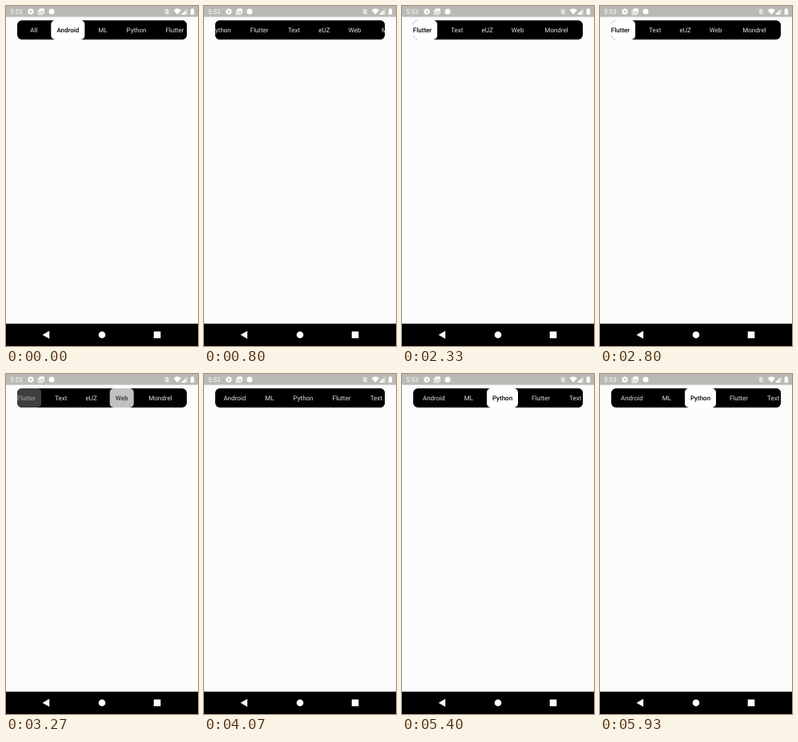
Recreate the animation shown at these times as an HTML page. Size 240 by 426 pixels, loop 5.99 s.

```html
<!DOCTYPE html>
<html lang="en">
<head>
<meta charset="utf-8">
<title>Scrolling tabs</title>
<style>
  html, body { margin: 0; width: 100%; height: 100%; overflow: hidden; background: #fcfcfc; }
  svg { display: block; width: 100%; height: 100%; }
  text { font-family: Roboto, Arial, sans-serif; font-size: 8px; text-rendering: geometricPrecision; }
</style>
</head>
<body>
<svg viewBox="0 0 240 426">
  <defs>
    <clipPath id="trackClip"><rect x="14" y="18" width="212" height="24" rx="6"/></clipPath>
  </defs>
  <rect width="240" height="426" fill="#fcfcfc"/>

  <g id="statusBar" fill="#fff">
    <rect width="240" height="13.6" fill="#b9b9b6"/>
    <text x="5" y="10">5:53</text>
    <g fill="none" stroke="#fff">
      <circle cx="31" cy="7" r="2.2" stroke-width="1.9"/>
      <circle cx="31" cy="7" r="3.5" stroke-width="1.1" stroke-dasharray="1.8 1.865"/>
      <path d="M40.2 5v5.8h6" stroke-width=".9"/>
    </g>
    <rect x="41.5" y="3.2" width="6.5" height="6.2" rx=".7"/>
    <path d="M42.5 8.3l1.5-2 1 1.2 1-1.5 1.3 2.3z" fill="#b9b9b6"/>
    <circle cx="57" cy="7" r="3.5"/>
    <path d="M198.3 9.5l1-1V6.4q0-2 1.7-2.4.2-1 .8 0 1.7.4 1.7 2.4v2.1l1 1zM200.5 10h1.8q-.9 1.3-1.8 0z" fill-opacity=".85"/>
    <path d="M198 3.4l6.8 7.2" stroke="#b9b9b6" stroke-width="1.5"/>
    <path d="M198 3.4l6.8 7.2" stroke="#fff" stroke-width=".7"/>
    <path d="M209.5 5.2q4.7-3.7 9.4 0L214.2 10.8z"/>
    <path d="M219 10.8l7.5-7.5v7.5z" fill-opacity=".6"/>
    <path d="M219 10.8l5-5v5z"/>
    <path d="M230.6 4h1.3v-.9h1.9V4h1.3v6.8h-4.5z"/>
  </g>

  <g clip-path="url(#trackClip)">
    <rect x="14" y="18" width="212" height="24"/>
    <g id="strip"></g>
  </g>

  <rect y="398" width="240" height="28"/>
  <g fill="#fff">
    <path d="M45.6 412l8.6-4.9v9.8z"/>
    <circle cx="120" cy="412" r="4.3"/>
    <rect x="184.7" y="407.7" width="8.6" height="8.6" rx=".4"/>
  </g>
</svg>
<script>
const LOOP = 5990, GAP = 24, PAD = 7.1, FADE = 200, TEXT_LIGHT = 0.88;
const labels = [
  ["All", 9.1], ["Android", 27.9], ["ML", 11.3], ["Python", 24.8], ["Flutter", 23],
  ["Text", 15.6], ["eUZ", 12.2], ["Web", 15.8], ["Mondrel", 32.7]
];
const selections = [
  { at: -FADE, tab: "Android" },
  { at: 1750, tab: "Flutter" },
  { at: 3120, tab: "Web" },
  { at: 4560, tab: "Python" }
];
const flings = [
  { at: 480, length: 840, by: 185.4 },
  { at: 3520, length: 700, by: -147.9 }
];

const strip = document.getElementById("strip");
const clamp = v => Math.min(1, Math.max(0, v));
const gray = v => `rgb(${Array(3).fill(Math.round(255 * v))})`;

function add(name, attrs) {
  const node = document.createElementNS("http://www.w3.org/2000/svg", name);
  for (const key in attrs) node.setAttribute(key, attrs[key]);
  return strip.appendChild(node);
}

let left = 30.3;
const tabs = labels.map(([name, width]) => {
  const pill = add("rect", { x: left - PAD, y: 18, width: width + 2 * PAD, height: 24, rx: 5 });
  const text = add("text", { x: left + width / 2, y: 33, "text-anchor": "middle" });
  text.textContent = name;
  left += width + GAP;
  return { name, pill, text };
});

function scrollAt(t) {
  return flings.reduce((x, f) => x + f.by * (1 - (1 - clamp((t - f.at) / f.length)) ** 3), 0);
}

// Each new selection fades in while the previous one fades out.
function selectedAmount(name, t) {
  return selections.reduce((amount, s) => {
    const p = clamp((t - s.at) / FADE);
    return amount + ((s.tab === name ? 1 : 0) - amount) * p;
  }, 0);
}

function draw(t) {
  strip.setAttribute("transform", `translate(${-scrollAt(t)} 0)`);
  for (const { name, pill, text } of tabs) {
    const amount = selectedAmount(name, t);
    pill.setAttribute("fill", gray(amount));
    text.setAttribute("fill", gray((1 - amount) * TEXT_LIGHT));
    text.setAttribute("font-weight", amount > 0.5 ? 500 : 400);
  }
}

const start = performance.now();
function frame() {
  draw((performance.now() - start) % LOOP);
  requestAnimationFrame(frame);
}
draw(0);
requestAnimationFrame(frame);
</script>
</body>
</html>
```
